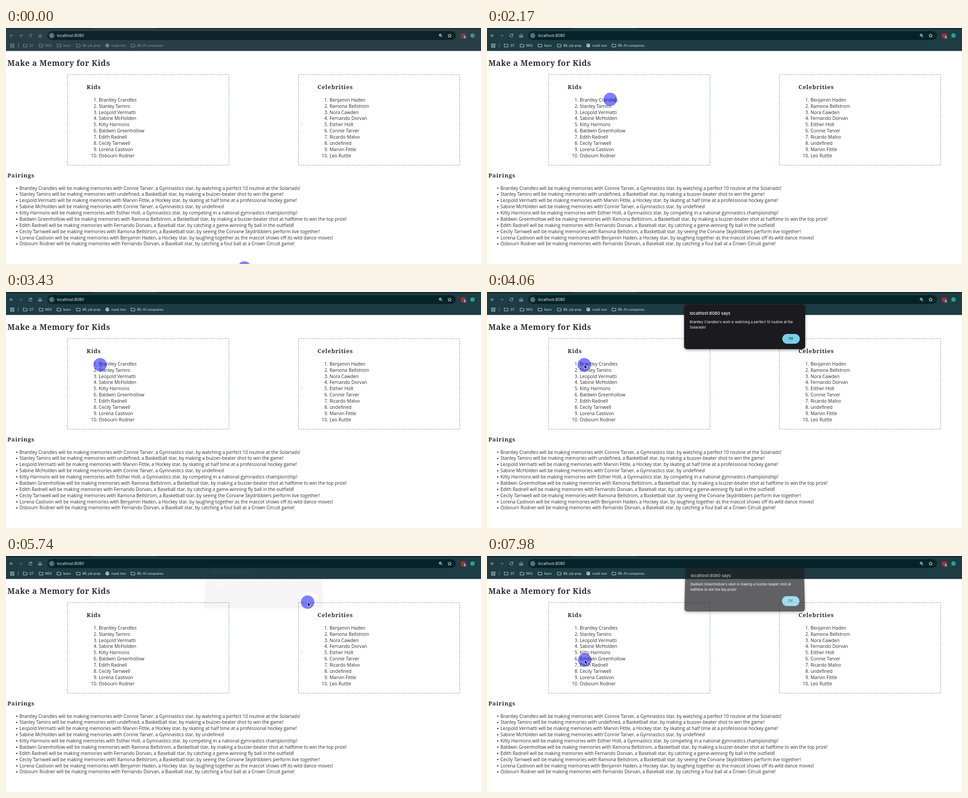
Animation of 1060x529 px, one loop 8 s. Source, as an HTML page with a canvas:

```html
<!DOCTYPE html>
<html lang="en">
<head>
<meta charset="utf-8">
<title>Make a Memory for Kids</title>
<style>
  html, body { margin: 0; width: 100%; height: 100%; overflow: hidden; background: #fff; }
  canvas { position: absolute; left: 0; top: 0; }
  #dialog {
    position: absolute; left: 440px; top: 28px; width: 270px; height: 99.5px;
    border-radius: 7px; background: #1b1b1f; color: #fff;
    box-shadow: 0 0 1px rgba(0, 0, 0, .5), 0 2px 6px rgba(0, 0, 0, .4);
    font: 7.75px/12px Inter, sans-serif; transform-origin: 50% 100%;
  }
  #dialog > * { position: absolute; margin: 0; white-space: pre; }
  #dialog h3 { left: 12.5px; top: 14px; font-size: 9.4px; font-weight: 500; }
  #dialog p { left: 12.5px; top: 32.5px; }
  #dialog b {
    left: 219px; top: 66px; width: 38.5px; height: 21.5px; border-radius: 11px;
    background: #78d0e8; color: #0c3a47; line-height: 21.5px; text-align: center; font-weight: 500;
  }
</style>
</head>
<body>
<canvas id="page" width="1060" height="529"></canvas>
<div id="dialog"><h3>localhost:8080 says</h3><p></p><b>OK</b></div>
<canvas id="pointer" width="1060" height="529"></canvas>
<script>
const page = document.getElementById('page').getContext('2d');
const overlay = document.getElementById('pointer').getContext('2d');
const dialog = document.getElementById('dialog');
const message = dialog.querySelector('p');

const LOOP = 8000, STEP = 70, LAG = 40, ROW = 13.88;
const BODY = '10.27px "Open Sans", sans-serif';
const INK = '#2c2c2c';

const kids = ['Brantley Crandles', 'Stanley Tamiro', 'Leopold Vermatti', 'Sabine McHolden',
  'Kitty Harmons', 'Baldwin Greenhollow', 'Edith Radnell', 'Cecily Tarnwell',
  'Lorena Castivon', 'Osbourn Rodner'];
const stars = ['Benjamin Haden', 'Ramona Bellstrom', 'Nora Cawden', 'Fernando Dorvan',
  'Esther Holt', 'Connie Tarver', 'Ricardo Malvo', 'undefined', 'Marvin Fittle', 'Leo Ruttle'];

// Star index, sport and wish for each kid in turn.
const pairings = [
  [5, 'Gymnastics', 'watching a perfect 10 routine at the Solariads!'],
  [7, 'Basketball', 'making a buzzer-beater shot to win the game!'],
  [8, 'Hockey', 'skating at half time at a professional hockey game!'],
  [5, 'Gymnastics', 'undefined'],
  [4, 'Gymnastics', 'competing in a national gymnastics championship!'],
  [1, 'Basketball', 'making a buzzer-beater shot at halftime to win the top prize!'],
  [3, 'Baseball', 'catching a game-winning fly ball in the outfield!'],
  [1, 'Basketball', 'seeing the Corvane Skydribblers perform live together!'],
  [0, 'Hockey', 'laughing together as the mascot shows off its wild dance moves!'],
  [3, 'Baseball', 'catching a foul ball at a Crown Circuit game!']
];

// Pointer halo: time, x, y
const path = [
  [210, 532, 538], [280, 478, 478], [350, 380, 370], [420, 304, 288], [490, 304, 288],
  [700, 298, 250], [910, 285, 205], [1120, 274, 172], [1330, 268, 163], [1400, 267, 161],
  [1680, 272, 161], [2100, 272, 161], [2170, 275, 160], [2380, 330, 165], [2590, 383, 168],
  [2800, 310, 163], [2940, 255, 160], [3220, 212, 163], [3360, 212, 163], [3430, 210, 163],
  [3640, 217, 163], [4130, 217, 163], [4200, 228, 161], [4480, 420, 130], [4690, 580, 107],
  [4830, 615, 103.5], [4970, 637, 103.5], [5250, 681, 107], [5390, 674, 104], [5460, 673, 103.5],
  [5780, 673, 103.5], [5810, 655, 108], [6020, 480, 160], [6160, 340, 215], [6300, 274, 231],
  [6510, 234, 233], [6720, 222, 235], [7070, 218, 233]
];
const presses = [[3780, 3850], [5530, 5600], [7770, 7910]];

const within = (t, [from, to]) => t >= from && t < to;

function locate(t) {
  const next = path.findIndex(p => p[0] > t);
  if (next === 0) return path[0].slice(1);
  if (next < 0) return path[path.length - 1].slice(1);
  const [t0, x0, y0] = path[next - 1], [t1, x1, y1] = path[next];
  const f = (t - t0) / (t1 - t0);
  return [x0 + (x1 - x0) * f, y0 + (y1 - y0) * f];
}

function text(str, x, y, font, color, align = 'left', spacing = 0) {
  page.font = font;
  page.fillStyle = color;
  page.textAlign = align;
  page.letterSpacing = spacing + 'px';
  page.fillText(str, x, y);
}

function heading(str, x, y, size, spacing) {
  text(str, x, y, `bold ${size}px "Noto Serif", serif`, '#303030', 'left', spacing);
}

function rounded(x, y, w, h, r, color) {
  page.fillStyle = color;
  page.beginPath();
  page.roundRect(x, y, w, h, r);
  page.fill();
}

function disc(c, x, y, r, color) {
  c.fillStyle = color;
  c.beginPath();
  c.arc(x, y, r, 0, 7);
  c.fill();
}

function stroke(d, x, y, color) {
  page.save();
  page.translate(x, y);
  page.strokeStyle = color;
  page.lineWidth = 1;
  page.stroke(new Path2D(d));
  page.restore();
}

function drawBrowser(active) {
  const bar = active ? '#1e3c44' : '#293f45';
  const icon = active ? '#c6d5d8' : '#87969a';
  const dim = active ? '#667e84' : '#87969a';
  const label = active ? '#d5e2e5' : '#8b9a9e';
  const pill = active ? '#06232a' : '#0b2329';
  const bright = '#e3eaec';

  page.fillStyle = bar;
  page.fillRect(0, 0, 1060, 51.5);
  page.fillStyle = active ? '#0b252c' : '#1a2f35';
  page.fillRect(0, 0, 195, 2);
  page.fillRect(338, 0, 722, 2);

  stroke('M3.5 0H-3.5M0 -3.5L-3.5 0L0 3.5', 12, 17, icon);
  stroke('M-3.5 0H3.5M0 -3.5L3.5 0L0 3.5', 33, 17, dim);
  stroke('M2.6 -2.2A3.4 3.4 0 1 0 3.4 .8M3.3 -3.8V-1.2H.7', 54.5, 17, icon);
  stroke('M-3.2 -.8L0 -3.6L3.2 -.8V3.6H1V1H-1V3.6H-3.2Z', 76, 17, icon);

  rounded(92, 7, 912, 20, 10, pill);
  disc(page, 102, 17, 7.5, bar);
  stroke('M3.6 0A3.6 3.6 0 1 0 -3.6 0A3.6 3.6 0 1 0 3.6 0M0 -.5V2M0 -2V-1.1', 102, 17, bright);
  text('localhost:8080', 114, 20, '8.5px Inter, sans-serif', bright);
  stroke('M1.6 -1A2.6 2.6 0 1 0 -3.6 -1A2.6 2.6 0 1 0 1.6 -1M1 1L3.8 3.8M-2.2 -1H.2M-1 -2.2V.2', 970, 17, bright);
  stroke('M0 -4L1.2 -1.3L4 -1L1.9 .9L2.5 3.7L0 2.2L-2.5 3.7L-1.9 .9L-4 -1L-1.2 -1.3Z', 990, 17, bright);

  rounded(1015, 12, 10, 10, 1.5, active ? '#c4222d' : '#a52f37');
  rounded(1019.5, 16.5, 8, 8, 2, '#45555a');
  text('4', 1023.5, 23.2, '500 7px Inter, sans-serif', '#fff', 'center');
  disc(page, 1041, 17, 5, active ? '#21a68d' : '#3b9586');

  for (const x of [-4, 1]) for (const y of [-4, 1]) stroke(`M${x} ${y}h3v3h-3Z`, 14, 39.5, icon);
  page.fillStyle = dim;
  page.fillRect(27, 34, 1, 10);

  const marks = [[38, 'GT'], [73.5, 'NSS'], [113.5, 'learn'], [156.5, 'ML job prep'],
    [221, 'mask text'], [278.5, 'ML-AI companies']];
  for (const [x, name] of marks) {
    if (name === 'mask text') {
      disc(page, 226, 39, 4.3, icon);
      stroke('M-3.6 -1.2L-1 -.2L-.4 2.4M.4 -3.6L1 -1.4L3.6 -.6', 226, 39, bar);
    } else {
      stroke('M.5 -3H3.4L4.4 -2H9V3.5H.5Z', x, 39, icon);
    }
    text(name, x + 13.9, 41.7, '7.2px Inter, sans-serif', label);
  }
}

function drawList(x, title, names) {
  page.strokeStyle = '#7d95a3';
  page.lineWidth = 1;
  page.setLineDash([3, 2]);
  page.strokeRect(x + .5, 104.5, 360, 203);
  page.setLineDash([]);
  heading(title, x + 43, 137, 13, .7);
  names.forEach((name, i) => {
    const y = 164.8 + i * ROW;
    text(i + 1 + '.', x + 67, y, BODY, INK, 'right');
    text(name, x + 70, y, BODY, INK);
  });
}

function drawPage(active) {
  page.fillStyle = '#fff';
  page.fillRect(0, 0, 1060, 529);
  drawBrowser(active);
  heading('Make a Memory for Kids', 3, 84.7, 17.5, .6);
  drawList(137, 'Kids', kids);
  drawList(652, 'Celebrities', stars);
  heading('Pairings', 3, 334.7, 13, .8);
  pairings.forEach(([star, sport, wish], i) => {
    const y = 362.5 + i * ROW;
    disc(page, 24, y - 3.4, 1.5, INK);
    text(`${kids[i]} will be making memories with ${stars[star]}, a ${sport} star, by ${wish}`,
      30, y, BODY, INK);
  });
}

// How far the dialog is tilted away: 0 is fully open, above 1 is hidden.
function tilt(t) {
  if (within(t, [3990, 4060])) return .4;
  if (within(t, [4060, 5600])) return 0;
  if (within(t, [5600, 5810])) return (t - 5600) / 140;
  if (t >= 7910) return .9 - (t - 7910) / 70 * .58;
  return 2;
}

function drawDialog(t) {
  const k = tilt(t);
  dialog.style.display = k > 1 ? 'none' : 'block';
  if (k > 1) return;
  message.textContent = t < 7000
    ? `${kids[0]}'s wish is watching a perfect 10 routine at the\nSolariads!`
    : `${kids[5]}'s wish is making a buzzer-beater shot at\nhalftime to win the top prize!`;
  const s = 1 - .01 * k;
  dialog.style.opacity = 1 - .95 * k;
  dialog.style.transform = k === 0 ? 'none' :
    `matrix3d(${s},0,0,0, 0,${s * (1 + .06 * k)},0,${-.0006 * k}, 0,0,1,0, 0,${-11.5 * k},0,1)`;
}

const ARROW = new Path2D('M0 0V8.4L1.9 6.7L3.2 9.5L4.6 8.9L3.4 6.2H6Z');
const BEAM = new Path2D('M-2.5 -5Q0 -5 0 -3.5Q0 -5 2.5 -5M0 -3.5V4M-2.5 5.5Q0 5.5 0 4Q0 5.5 2.5 5.5M-1.2 1.8H1.2');

function drawPointer(t) {
  overlay.clearRect(0, 0, 1060, 529);
  const [x, y] = locate(t);
  disc(overlay, x, y, 15, 'rgba(0, 0, 255, .5)');
  if (presses.some(p => within(t, p))) disc(overlay, x, y, 12, 'rgba(0, 0, 255, .2)');

  // The cursor runs slightly ahead of its halo.
  const [cx, cy] = locate(t + LAG);
  const arrow = t < 630 || within(t, [3990, 6300]) || t >= 7910;
  overlay.save();
  overlay.translate(cx + .5, cy + .3);
  overlay.lineJoin = 'round';
  if (arrow) {
    overlay.lineWidth = 1.6;
    overlay.strokeStyle = '#fff';
    overlay.stroke(ARROW);
    overlay.fillStyle = '#000';
    overlay.fill(ARROW);
  } else {
    overlay.lineWidth = 2;
    overlay.strokeStyle = 'rgba(255, 255, 255, .45)';
    overlay.stroke(BEAM);
    overlay.lineWidth = .9;
    overlay.strokeStyle = '#161630';
    overlay.stroke(BEAM);
  }
  overlay.restore();
}

let shown = null;
function frame() {
  const t = Math.floor(performance.now() % LOOP / STEP) * STEP;
  const active = t >= 1820;
  if (active !== shown) drawPage(shown = active);
  drawDialog(t);
  drawPointer(t);
  requestAnimationFrame(frame);
}
frame();
</script>
</body>
</html>
```
